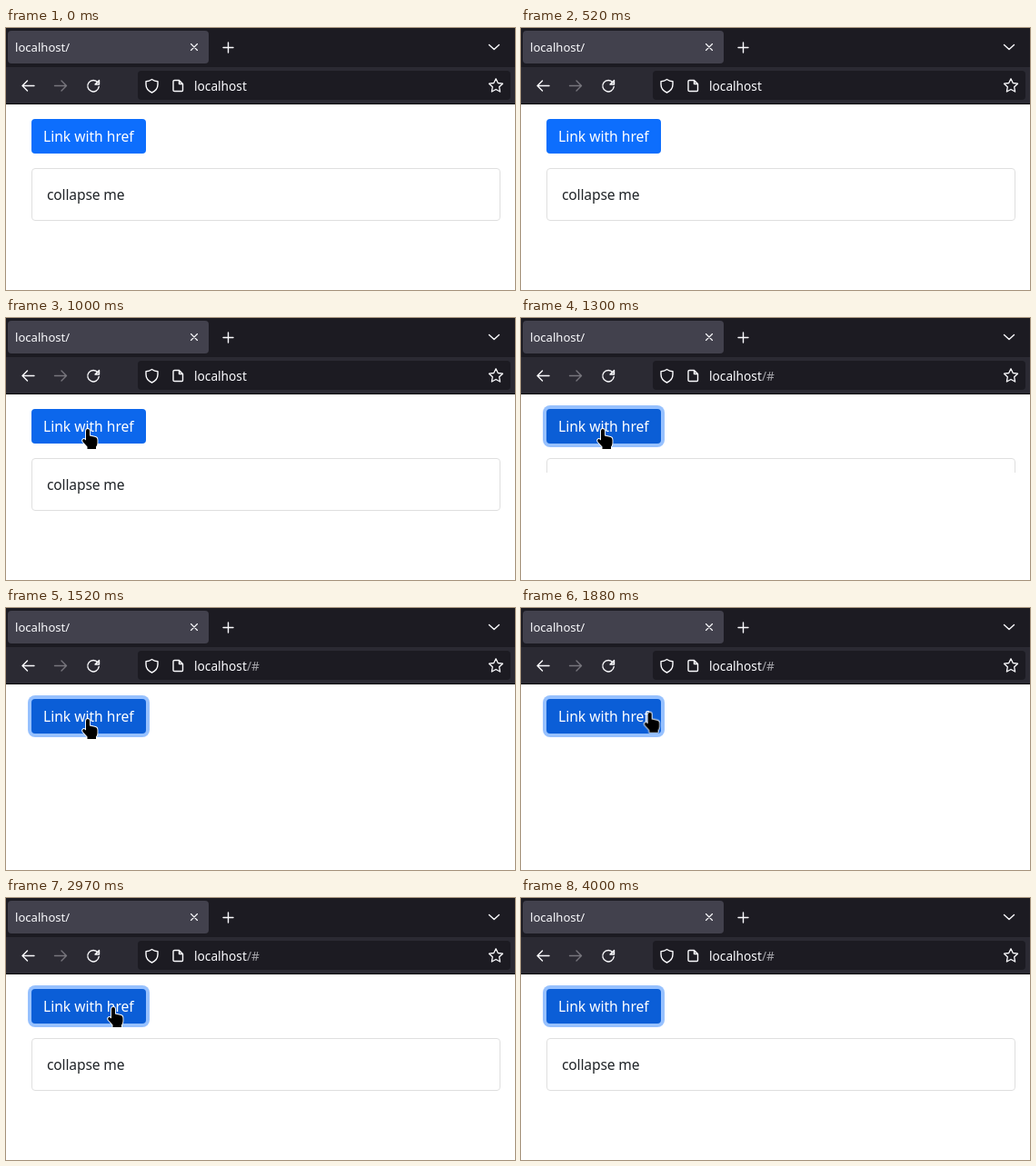
An HTML page for the animation above (4.03 s loop, 560 by 288 pixels).

```html
<!DOCTYPE html>
<html lang="en">
<head>
<meta charset="utf-8">
<title>Collapse link</title>
<style>
  html, body { margin: 0; width: 100%; height: 100%; overflow: hidden; background: #fff; }
  body { position: relative; font: 15.6px/24px "Noto Sans", "Open Sans", sans-serif; color: #212529; }
  svg { position: absolute; left: 0; top: 0; }
  .label { fill: #fbfbfe; }
  .icons { fill: none; stroke: #fbfbfe; stroke-width: 1.4; stroke-linecap: round; stroke-linejoin: round; }

  .btn, .fold { position: absolute; left: 28px; box-sizing: border-box; white-space: nowrap; }
  .btn {
    top: 100px; width: 126px; height: 38px; padding: 7px 13px;
    border-radius: 4px; color: #fff; background: #0d6efd;
    animation: tint 4030ms ease infinite, ring 4030ms ease infinite;
  }
  .fold { top: 154px; width: 516px; height: 58px; overflow: hidden; animation: fold 4030ms ease infinite; }
  .card {
    box-sizing: border-box; height: 58px; padding: 16px;
    border: 1px solid #dfdfdf; border-radius: 4px; letter-spacing: -.15px;
  }
  .hash { opacity: 0; animation: hash 4030ms step-end infinite; }
  .cursor { fill: #000; stroke: #fff; stroke-width: 1.8; stroke-linejoin: round; paint-order: stroke; }
  .cursor { opacity: 0; animation: move 4030ms linear infinite, show 4030ms step-end infinite; }
  .hand { animation: hand 4030ms step-end infinite; }
  .arrow { animation: arrow 4030ms step-end infinite; }

  /* hover, press, release */
  @keyframes tint {
    0%, 23.82% { background: #0d6efd; }
    27.54%, 27.79% { background: #0b5ed7; }
    29.78%, 30.52% { background: #0a58ca; }
    33%, 64.02% { background: #0b5ed7; }
    65.51%, 66.75% { background: #0a58ca; }
    68.98%, 100% { background: #0b5ed7; }
  }
  @keyframes ring {
    0%, 27.79% { box-shadow: 0 0 0 0 rgba(49, 132, 253, 0); }
    31.51%, 100% { box-shadow: 0 0 0 4px rgba(49, 132, 253, .5); }
  }
  @keyframes fold {
    0%, 28.54% { height: 58px; }
    37.22%, 64.76% { height: 0; }
    73.45%, 100% { height: 58px; }
  }
  @keyframes hash { 0% { opacity: 0; } 29.28%, 100% { opacity: 1; } }

  @keyframes move {
    0%, 16.87% { transform: translate(246px, 226px); }
    22.33% { transform: translate(130px, 150px); }
    24.07% { transform: translate(92px, 125px); }
    24.81%, 41.44% { transform: translate(90px, 122px); }
    43.67% { transform: translate(85px, 116px); }
    48.39% { transform: translate(174px, 114px); }
    51.12% { transform: translate(174px, 118px); }
    54.09% { transform: translate(152px, 121px); }
    55.58% { transform: translate(125px, 120px); }
    56.33% { transform: translate(116.5px, 118px); }
    57.07%, 78.91% { transform: translate(118px, 120px); }
    81.89% { transform: translate(150px, 104px); }
    87.84%, 100% { transform: translate(265px, 18px); }
  }
  @keyframes show { 0% { opacity: 0; } 16.87% { opacity: 1; } 87.84%, 100% { opacity: 0; } }
  @keyframes hand {
    0%, 47.32%, 82.26%, 100% { opacity: 0; }
    23.57%, 53.85% { opacity: 1; }
  }
  @keyframes arrow {
    0%, 47.32%, 82.26%, 100% { opacity: 1; }
    23.57%, 53.85% { opacity: 0; }
  }
</style>
</head>
<body>
<svg width="560" height="84" viewBox="0 0 560 84">
  <rect width="560" height="84" fill="#1c1b22"/>
  <rect x="2" y="3" width="221" height="36" rx="4" fill="#42414d"/>
  <rect y="43" width="560" height="40" fill="#2b2a33"/>
  <rect y="83" width="560" height="1" fill="#0c0c0d"/>
  <rect x="145" y="47" width="410" height="32" rx="4" fill="#1c1b22"/>
  <text class="label" x="10" y="26" font-size="13.1">localhost/</text>
  <text class="label" x="207" y="69" font-size="13.7">localhost</text>
  <text class="hash" x="265" y="69" font-size="13.7" fill="#a3a3a8">/#</text>
  <g class="icons">
    <path d="M203.5 17.5l7 7m0-7l-7 7" stroke-width="1.1"/>
    <path d="M239 21.5h11m-5.5-5.5v11"/>
    <path d="M531.5 18.5l5.500 5 5.500-5"/>
    <path d="M31 63.5H18m5.500-5.500l-5.500 5.500 5.500 5.500"/>
    <path d="M53.5 63.5h13m-5.500-5.500l5.500 5.500-5.500 5.500" stroke="#77767d"/>
    <path d="M101 60a6.200 6.200 0 1 0 1.200 4.500M102.500 57.500v4.500h-4.500z"/>
    <path d="M160.5 56.500q3 2 6.500 2.200v3.300q0 6-6.500 9-6.500-3-6.500-9v-3.300q3.500-.2 6.500-2.200z"/>
    <path d="M185.500 57.500h5l4 4v7q0 1-1 1h-8q-1.500 0-1.500-1v-10q0-1 1.500-1zm5 0v4h4"/>
    <path d="M539 55.800l2.300 4.700 5.200.7-3.800 3.600.9 5.200-4.600-2.500-4.600 2.500.9-5.200-3.800-3.600 5.200-.7z" stroke-width="1.3"/>
  </g>
</svg>

<div class="btn">Link with href</div>
<div class="fold"><div class="card">collapse me</div></div>

<svg width="560" height="288" viewBox="0 0 560 288">
  <g class="cursor">
    <path class="hand" d="M-2 2Q-2 0 0 0T2 2V7.500L8.500 9Q10.500 9.500 10.500 12V15.500Q10.500 17.500 9 19.500V22H-.5V19.500L-5.500 14Q-6.500 12 -4.800 11 -3.800 10.500 -2 12.500Z"/>
    <path class="arrow" d="M0 0V16L3.800 12.600 6.300 18 9 16.800 6.600 11.500H11.500Z"/>
  </g>
</svg>
</body>
</html>
```
